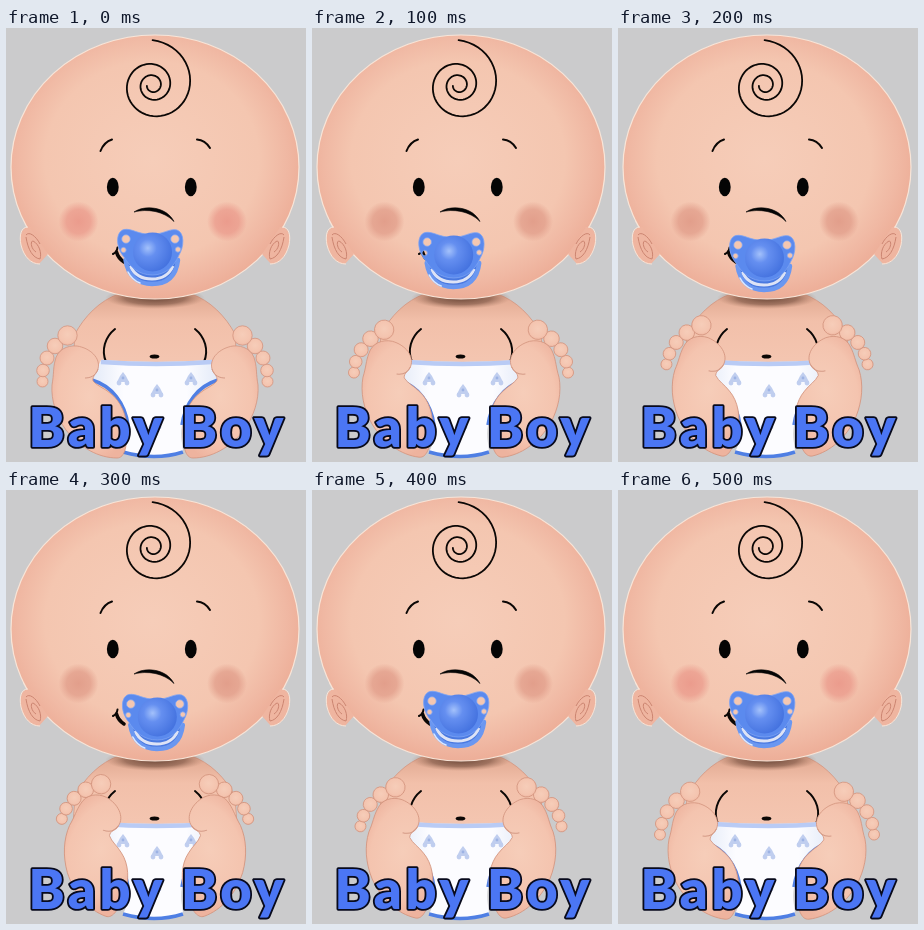
An HTML page for the animation above (600 ms loop, 300 px wide and 434 px high).

```html
<!DOCTYPE html>
<html lang="en">
<head>
<meta charset="utf-8">
<title>Baby Boy</title>
<style>
  html, body { margin: 0; width: 100%; height: 100%; overflow: hidden; background: #cbcbcc; }
  svg { display: block; width: 100%; height: 100%; }
  .title { font: 900 54px Lato, "Open Sans", sans-serif; letter-spacing: 3.6px;
    fill: #4b76f4; stroke: #080a1c; stroke-width: 3.6px; stroke-linejoin: round; paint-order: stroke; }
  .ink { fill: none; stroke: #0b0705; stroke-linecap: round; }
  .skin { stroke: #d4957f; stroke-width: .8; }
</style>
</head>
<body>
<svg viewBox="0 0 300 434" preserveAspectRatio="none">
  <defs>
    <radialGradient id="face" cx=".49" cy=".47" r=".53">
      <stop offset="0" stop-color="#f6cdb9"/>
      <stop offset=".7" stop-color="#f4c6b0"/>
      <stop offset=".88" stop-color="#f0b8a3"/>
      <stop offset="1" stop-color="#edae98"/>
    </radialGradient>
    <linearGradient id="torso" x1="0" y1="0" x2="0" y2="1">
      <stop offset="0" stop-color="#e0a890"/>
      <stop offset=".25" stop-color="#f2c0aa"/>
      <stop offset="1" stop-color="#f6cbb7"/>
    </linearGradient>
    <radialGradient id="limb" cx=".5" cy=".45" r=".6">
      <stop offset="0" stop-color="#f6cdb9"/>
      <stop offset=".7" stop-color="#f4c4af"/>
      <stop offset="1" stop-color="#eeb39e"/>
    </radialGradient>
    <radialGradient id="blush">
      <stop class="rosy" offset="0" stop-opacity=".9"/>
      <stop class="rosy" offset=".6" stop-opacity=".7"/>
      <stop class="rosy" offset="1" stop-opacity="0"/>
    </radialGradient>
    <radialGradient id="shade">
      <stop offset="0" stop-color="#5f3d2e" stop-opacity=".9"/>
      <stop offset=".6" stop-color="#7a5241" stop-opacity=".65"/>
      <stop offset="1" stop-color="#a87862" stop-opacity="0"/>
    </radialGradient>
    <radialGradient id="knob" cx=".38" cy=".4" r=".65">
      <stop offset="0" stop-color="#a3c1fb"/>
      <stop offset=".35" stop-color="#658ff0"/>
      <stop offset="1" stop-color="#4472df"/>
    </radialGradient>
    <linearGradient id="nappy" x1="0" x2="1">
      <stop offset="0" stop-color="#e3eaf8"/>
      <stop offset=".25" stop-color="#fcfcff"/>
      <stop offset=".75" stop-color="#fcfcff"/>
      <stop offset="1" stop-color="#e3eaf8"/>
    </linearGradient>

    <g id="ear">
      <path fill="#efb5a0" d="M24 199C16 198 13 207 15 217C18 229 25 236 33 236L42 226Z"/>
      <path fill="none" stroke="#f8e5d8" d="M22 199C15 199 13 207 15 217C18 229 25 236 34 236"/>
      <path fill="none" stroke="#cc8571" d="M20 207C23 203 30 208 34 216M20 209C22 222 27 230 34 231C36 225 33 216 27 213C24 213 25 221 30 224"/>
    </g>
    <g id="leg">
      <g class="skin" fill="url(#limb)">
        <circle cx="36.5" cy="353.5" r="5.5"/>
        <circle cx="37" cy="342.5" r="6.3"/>
        <circle cx="41" cy="330" r="7"/>
        <circle cx="49" cy="318" r="7.8"/>
        <circle cx="61.5" cy="307.5" r="9.7"/>
        <path d="M49 333C51 322 61 317 71 318C84 320 95 330 92 341C91 345 86 348 87 353C91 358 98 360 104 365C115 373 121 388 121 402C121 418 119 430 111 430C93 430 74 420 60 402C50 388 45 372 46 357C48 346 47 341 49 333Z"/>
      </g>
      <path fill="none" stroke="#d49a86" d="M92 341C90 348 84 350 79 350"/>
    </g>
    <g id="toy" fill="#c0ceef">
      <path d="M-3 -3L0 -7L3 -3L6 3H-6Z"/>
      <circle cx="-4" cy="4" r="2.4"/><circle cx="4" cy="4" r="2.4"/>
      <circle cy="-1" r="1.4" fill="#9db3e4"/>
    </g>
  </defs>

  <rect width="300" height="434" fill="#cbcbcc"/>

  <path class="skin" fill="url(#torso)" d="M113 266C94 272 78 289 69 306L66 350L90 375H208L232 350L229 306C220 289 204 272 185 266Z"/>
  <ellipse cx="149" cy="270" rx="50" ry="11" fill="url(#shade)"/>
  <path class="ink" stroke-width="2" d="M109 301C99 309 95 322 100 334M189 301C199 309 203 322 198 334"/>
  <ellipse cx="148.5" cy="328.5" rx="4.8" ry="2" fill="#0b0705"/>

  <path fill="url(#nappy)" d="M95 332Q150 336 206 332L212 352C192 358 179 375 176 397C174 410 177 418 177 424Q149 433 117 424C120 418 124 410 122 397C119 375 106 358 86 352Z"/>
  <path fill="none" stroke="#b9cbf5" stroke-width="4.5" d="M95 334Q150 338 206 334"/>
  <path fill="none" stroke="#4f7fe4" stroke-width="3.5" d="M86 352C106 358 119 375 122 397M212 352C192 358 179 375 176 397M117 424Q149 433 177 424"/>
  <use href="#toy" x="117" y="351"/>
  <use href="#toy" x="151" y="363"/>
  <use href="#toy" x="185" y="351"/>
  <use href="#toy" x="149" y="395"/>

  <use class="leg" href="#leg"/>
  <g transform="matrix(-1 0 0 1 298 0)"><use class="leg" href="#leg"/></g>

  <ellipse cx="149" cy="139" rx="144" ry="132" fill="url(#face)" stroke="#f8e5d8" stroke-width="1.2"/>
  <use href="#ear"/>
  <use href="#ear" transform="matrix(-1 0 0 1 298 0)"/>
  <path id="curl" class="ink" stroke-width="1.8"/>
  <path class="ink" stroke-width="2" d="M94.5 123Q98 114 106 111.5M191 111.5Q199 112 204 120"/>
  <g fill="#050505">
    <ellipse cx="106.8" cy="159" rx="5.9" ry="9.2"/>
    <ellipse cx="184.8" cy="159" rx="5.9" ry="9.2"/>
    <path d="M128 184C138 177 160 178 168 193.5C158 183 141 180.500 128 184Z" stroke="#050505" stroke-width=".6"/>
  </g>
  <g fill="url(#blush)">
    <circle cx="72.500" cy="193.500" r="20"/>
    <circle cx="221" cy="193.500" r="20"/>
  </g>
  <path class="ink" stroke-width="2" d="M107 226Q111 224 111.500 219.500"/>
  <path class="ink" stroke-width="3.5" d="M110.500 224Q112 230 118 234"/>

  <g id="dummy">
    <path fill="#4a79e0" d="M119 231C122 248 133 255 146 255C160 255 170 248 172 231Z"/>
    <path fill="none" stroke="#dde3f6" stroke-width="3" d="M124 238C129 248 137 251 146 251C156 251 163 247 167 238"/>
    <path fill="none" stroke="#6a97f1" stroke-width="4.5" stroke-linecap="round" d="M119.500 232C122 249 133 256 146 256C160 256 170 249 172 232"/>
    <path fill="none" stroke="#dbe8ff" stroke-width="1.6" stroke-linecap="round" d="M122 244Q126 252 134 255"/>
    <path id="shield" fill="#5b8aee" fill-rule="evenodd" stroke="#7da4f4" stroke-width=".8"/>
    <circle cx="146.500" cy="224" r="19.500" fill="url(#knob)"/>
  </g>

  <text class="title" x="22.500" y="419">Baby</text>
  <text class="title" x="175" y="419">Boy</text>
</svg>
<script>
  const STEP = 100, COUNT = 6, LIFT = 20;
  const $ = id => document.getElementById(id);
  const legs = document.querySelectorAll(".leg");
  const rosy = document.querySelectorAll(".rosy");

  function spiral(cx, cy, r, turns) {
    const pts = [];
    for (let a = 0; a <= turns * 2 * Math.PI; a += 0.12) {
      const d = r * Math.exp(-0.12 * a);
      pts.push((cx + d * Math.sin(a)).toFixed(2) + " " + (cy - d * Math.cos(a)).toFixed(2));
    }
    return "M" + pts.join("L");
  }

  const hole = (x, y, r) => `M${x - r} ${y}a${r} ${r} 0 1 0 ${2 * r} 0a${r} ${r} 0 1 0 ${-2 * r} 0Z`;

  function draw(ms) {
    const i = Math.floor(ms / STEP) % COUNT;
    // Legs rise for half the loop and fall back the same way.
    const angle = LIFT * Math.min(i, COUNT - i) / 3;
    // The dummy makes one round in four steps, then rests.
    const a = Math.min(i, 4) * Math.PI / 2;
    const x = -4.8 * Math.sin(a), y = 3 * (1 - Math.cos(a));
    legs.forEach(l => l.setAttribute("transform", `rotate(${angle} 116 396)`));
    $("dummy").setAttribute("transform", `translate(${x} ${y})`);
    const tone = i === 0 || i === 5 ? "#ea9789" : "#e09a87";
    rosy.forEach(s => s.setAttribute("stop-color", tone));
  }

  function tick() {
    draw(performance.now() - start);
    requestAnimationFrame(tick);
  }

  $("curl").setAttribute("d", spiral(146.6, 57.2, 45, 2.75));
  $("shield").setAttribute("d",
    "M118 201.5C126 200 133 207 145 206C157 207 163 200 171 202C179 205 178 219 173 227C168 239 159 247 146.500 247C133 247 124 239 118 229C110 220 109 204 118 201.500Z" +
    hole(120, 211, 4.3) + hole(169, 211, 4.3) + hole(117.5, 222, 2.7) + hole(172, 221.5, 2.7));
  const start = performance.now();
  tick();
</script>
</body>
</html>
```
